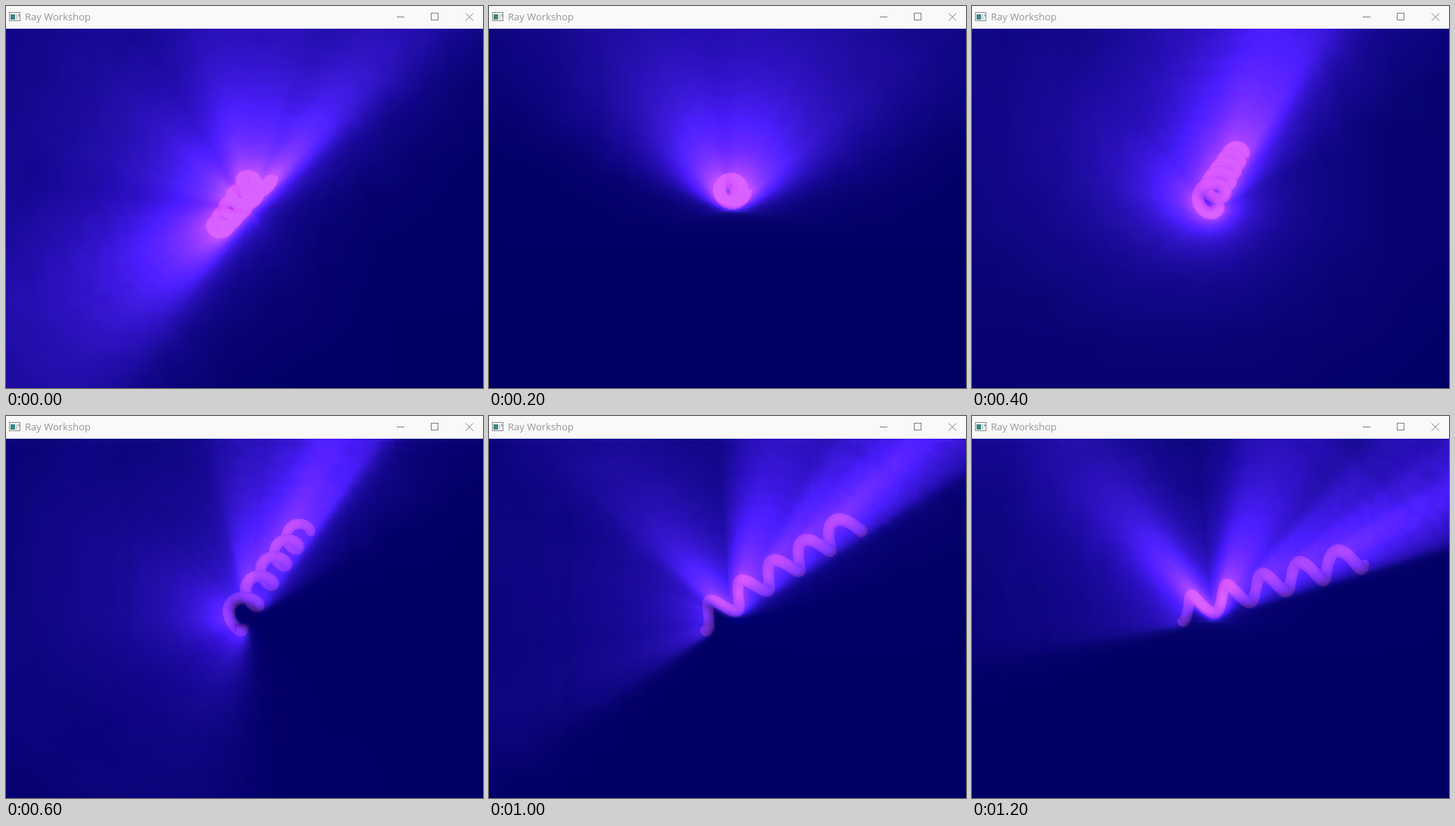
Animation of 631 by 505 pixels, one loop 1.3 s. Source, as an HTML page with a canvas:

```html
<!DOCTYPE html>
<html lang="en">
<head>
<meta charset="utf-8">
<title>Ray Workshop</title>
<style>
  html, body { margin: 0; width: 100%; height: 100%; overflow: hidden; background: #000064; }
  .bar { position: absolute; left: 0; top: 0; width: 631px; height: 30px; background: #f9f9f9; }
  .bar text { font: 13px "Open Sans", "Noto Sans", sans-serif; fill: #959595; }
  canvas { position: absolute; left: 0; top: 30px; }
</style>
</head>
<body>
<svg class="bar" viewBox="0 0 631 30">
  <rect x="4.5" y="8.5" width="14" height="11" fill="#f4f4f4" stroke="#8f8f8f"/>
  <rect x="6" y="11" width="6" height="7" fill="#3b8585"/>
  <rect x="13" y="11" width="2" height="7" fill="#c9d3d3"/>
  <rect x="16" y="11" width="2" height="3" fill="#a5b5c5"/>
  <text x="25" y="19">Ray Workshop</text>
  <g fill="none" stroke="#808080">
    <path d="M517 14.5H527"/>
    <rect x="562.5" y="9.5" width="9" height="9"/>
    <path d="M608 9.5L618 19.5M618 9.5L608 19.5"/>
  </g>
</svg>
<canvas id="view" width="631" height="475"></canvas>
<script>
// The viewport is slightly larger than the visible canvas
const W = 640, H = 480, TEX = 128;
const STEP = 100, STEPS = 13;
const RAD = Math.PI / 180;
const FOCAL = H / 2 / Math.tan(25 * RAD);
const TINT = [68, 30, 132];
const BACKDROP = '#000064', BRIGHTEST = '#d862ff';
// Helix angle in degrees at every second step
const ANGLES = [-50, -7, 36, 80, 126.5, 172, 216];

const ctx = document.getElementById('view').getContext('2d');
const texture = document.createElement('canvas');
texture.width = texture.height = TEX;
const texCtx = texture.getContext('2d');

const sub = (a, b) => a.map((v, i) => v - b[i]);
const dot = (a, b) => a[0] * b[0] + a[1] * b[1] + a[2] * b[2];
const cross = (a, b) => [
  a[1] * b[2] - a[2] * b[1],
  a[2] * b[0] - a[0] * b[2],
  a[0] * b[1] - a[1] * b[0]
];

function angleAt(step) {
  const i = Math.min(step >> 1, ANGLES.length - 2);
  const f = step / 2 - i;
  return 1080 + ANGLES[i] + (ANGLES[i + 1] - ANGLES[i]) * f;
}

// Surface point of the helix in camera space (x right, y up, z = depth)
function makeSurface(angle) {
  const a = angle / 2 * RAD, b = angle / 3 * RAD;
  const sa = Math.sin(a), ca = Math.cos(a), sb = Math.sin(b), cb = Math.cos(b);
  const len = Math.hypot(5, 50), sin = 5 / len, cos = 50 / len;
  return (phi, theta) => {
    const v = phi * RAD, u = theta * RAD, r = 1.5;
    const ring = (2 + Math.cos(v)) * r;
    const x = Math.cos(u) * ring, y = Math.sin(u) * ring;
    const z = (u - 2 * Math.PI + Math.sin(v)) * r;
    const x1 = x * cb + z * sb, z1 = z * cb - x * sb;
    const dy = y * ca - z1 * sa - 5;
    const dz = 100 - (y * sa + z1 * ca);
    return [x1, dy * cos + dz * sin, dz * cos - dy * sin];
  };
}

function buildQuads(angle) {
  const at = makeSurface(angle), quads = [];
  for (let phi = 0; phi < 360; phi += 20) {
    for (let theta = 0; theta <= 1800; theta += 20) {
      const p = [at(phi, theta), at(phi + 20, theta), at(phi + 20, theta + 20), at(phi, theta + 20)];
      const n = cross(sub(p[2], p[0]), sub(p[3], p[1]));
      const facing = Math.abs(dot(n, p[0])) / (Math.hypot(...n) * Math.hypot(...p[0]) || 1);
      const light = 0.57 + 0.43 * facing;
      quads.push({
        depth: p[0][2] + p[1][2] + p[2][2] + p[3][2],
        color: `rgb(${TINT.map(c => Math.round(c * light))})`,
        points: p.map(([x, y, z]) => [W / 2 + x * FOCAL / z, H / 2 - y * FOCAL / z])
      });
    }
  }
  return quads.sort((a, b) => b.depth - a.depth);
}

function drawQuads(c, quads) {
  c.lineWidth = 0.6;
  c.lineJoin = 'round';
  for (const q of quads) {
    c.beginPath();
    q.points.forEach(([x, y]) => c.lineTo(x, y));
    c.closePath();
    c.fillStyle = c.strokeStyle = q.color;
    c.fill();
    c.stroke();
  }
}

// Additive zoomed copies around the centre form the rays
function drawRays(copies, inc) {
  ctx.globalCompositeOperation = 'lighter';
  ctx.imageSmoothingQuality = 'low';
  for (let i = 0; i < copies; i++) {
    const zoom = 1 / (1 - 2 * inc * i);
    ctx.globalAlpha = 0.1 + 0.06 * i / copies;
    ctx.drawImage(texture, W / 2 * (1 - zoom), H / 2 * (1 - zoom), W * zoom, H * zoom);
  }
}

function fillView(color, mode) {
  ctx.globalAlpha = 1;
  ctx.globalCompositeOperation = mode;
  ctx.fillStyle = color;
  ctx.fillRect(0, 0, W, H);
}

function draw(step) {
  const quads = buildQuads(angleAt(step));
  texCtx.setTransform(1, 0, 0, 1, 0, 0);
  texCtx.fillStyle = '#000';
  texCtx.fillRect(0, 0, TEX, TEX);
  texCtx.setTransform(TEX / W, 0, 0, TEX / H, 0, 0);
  drawQuads(texCtx, quads);

  fillView(BACKDROP, 'source-over');
  drawQuads(ctx, quads);
  drawRays(25, 0.02);
  fillView(BRIGHTEST, 'darken');
}

const start = performance.now();
let shown = -1;
function tick() {
  const step = Math.floor((performance.now() - start) / STEP) % STEPS;
  if (step !== shown) draw(shown = step);
  requestAnimationFrame(tick);
}
tick();
</script>
</body>
</html>
```
